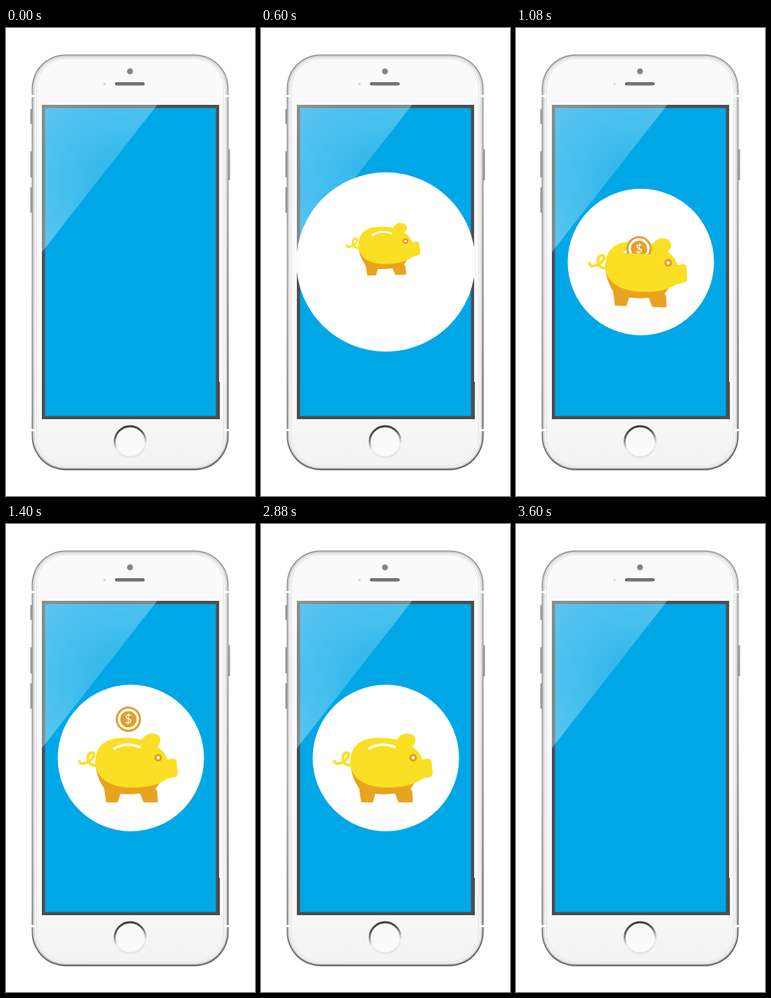
An HTML page that plays this animation: 354 px wide and 664 px high, repeating every 4.8 s.

```html
<!DOCTYPE html>
<html lang="en">
<head>
<meta charset="utf-8">
<title>Savings app</title>
<style>
html, body { margin: 0; width: 100%; height: 100%; overflow: hidden; background: #fff; }
svg { display: block; width: 100vw; height: 100vh; }
</style>
</head>
<body>
<svg viewBox="0 0 354 664">
  <defs>
    <linearGradient id="face" x2="0" y2="1">
      <stop offset="0" stop-color="#fafafa"/>
      <stop offset=".8" stop-color="#fafafa"/>
      <stop offset="1" stop-color="#f3f3f3"/>
    </linearGradient>
    <linearGradient id="rim" x2=".3" y2="1">
      <stop offset="0" stop-color="#999"/>
      <stop offset=".5" stop-color="#a4a4a4"/>
      <stop offset="1" stop-color="#6c6c6c"/>
    </linearGradient>
    <radialGradient id="gloss" gradientUnits="userSpaceOnUse" cx="162" cy="217" r="155">
      <stop offset="0" stop-color="#fff" stop-opacity=".17"/>
      <stop offset="1" stop-color="#fff" stop-opacity=".37"/>
    </radialGradient>
    <linearGradient id="ring" x1=".4" x2=".6" y2="1">
      <stop offset="0" stop-color="#3d3d3d"/>
      <stop offset=".25" stop-color="#5a5a5a"/>
      <stop offset=".5" stop-color="#bbb"/>
      <stop offset=".65" stop-color="#eee"/>
      <stop offset="1" stop-color="#e4e4e4"/>
    </linearGradient>
    <clipPath id="screen"><rect x="51" y="109" width="252" height="445"/></clipPath>
    <clipPath id="slot"><path d="M150 240H198V321Q174 319 150 321Z"/></clipPath>
  </defs>

  <g id="phone">
    <path d="M36 115V136M36 175V212M36 226V262M317 172V216" stroke="#999" stroke-width="3"/>
    <rect x="36.500" y="37.500" width="280" height="590" rx="48" fill="url(#rim)"/>
    <rect x="38.500" y="39.500" width="276" height="585.500" rx="46" fill="#e6e6e6"/>
    <rect x="40" y="41" width="273" height="583" rx="45" fill="#f4f4f4" stroke="#d0d0d0"/>
    <rect x="43.500" y="43.500" width="266" height="578" rx="42" fill="url(#face)" stroke="#e4e4e4"/>
    <path d="M36 96.500H43M310 96.500H317M36 570.500H43M310 570.500H317" stroke="#fff" stroke-width="3"/>
    <circle cx="176.300" cy="61.500" r="4.200" fill="#858585"/>
    <circle cx="140" cy="79.500" r="2" fill="#dcdcdc"/>
    <rect x="155" y="77" width="42" height="4.500" rx="2.200" fill="#5c5c5c"/>
    <path d="M158 79.500H195" stroke="#aaa" stroke-width="2" stroke-dasharray="1 1"/>
    <circle cx="176.500" cy="587" r="22" fill="#fafafa" stroke="url(#ring)" stroke-width="3"/>
    <path d="M51 109H303V502H304V555H51Z" fill="#4d4d4f"/>
    <rect x="55.500" y="113.500" width="243" height="437" fill="#00a7e7"/>
    <path d="M51 109H215L51 318Z" fill="url(#gloss)"/>
  </g>

  <g clip-path="url(#screen)">
    <circle id="disc" cx="177.500" cy="332" fill="#fff"/>
    <g id="pig">
      <path fill="#e8a41f" d="M127 336C127 352 133 366 139.500 375L142.500 395H159L162.500 383Q177 384 190.500 382.500L195.500 395H216L215 379L212.500 376L218 368L224 350Z"/>
      <path fill="none" stroke="#fadf24" stroke-width="4" stroke-linecap="round" d="M104.500 336.500C105 342 114 340 119 336C126 330.500 127 323.500 121 324.500C114.500 326 115 338 121 341Q125 343 130 342"/>
      <path fill="#fadf24" d="M127 337C127 319 138 304 164 303.500Q182 303 193 306C199 298 204 297 209 297.500C217 298 220 302 219.500 307Q219 312 215 316Q225 322 229.500 334L238 333Q242 333 242.500 337L244 354Q244 358 240 359L229 361.500C219 369 204 374 180 374C151 374 127 363 127 337Z"/>
      <path fill="none" stroke="#fff" stroke-width="3.600" stroke-linecap="round" d="M154 318.500Q171 308.500 190 316.500"/>
      <circle cx="216.300" cy="331.700" r="3.900" fill="#fff" stroke="#e59a24" stroke-width="3"/>
      <g clip-path="url(#slot)">
        <g id="coin">
          <circle r="18" fill="#e59f2a"/>
          <circle r="13.300" fill="#e59f2a" stroke="#fff" stroke-width="3.400"/>
          <text y="6" text-anchor="middle" font-family="Lato, sans-serif" font-size="17" fill="#fff">$</text>
        </g>
      </g>
    </g>
  </g>
</svg>
<script>
const LOOP = 4800;
const [disc, pig, coin] = ['disc', 'pig', 'coin'].map(id => document.getElementById(id));

const ease = x => x < .5 ? 4 * x ** 3 : 1 - 4 * (1 - x) ** 3;

// Eased value at time t along [time, value] keys
function track(t, keys) {
  const i = keys.findIndex(k => k[0] > t);
  if (i < 0) return keys[keys.length - 1][1];
  if (i === 0) return keys[0][1];
  const [t0, a] = keys[i - 1], [t1, b] = keys[i];
  return a + (b - a) * ease((t - t0) / (t1 - t0));
}

const radius = [[0, 0], [540, 129], [780, 101.4], [1000, 104], [2870, 104], [3030, 137], [3600, 0]];
const size = [[420, 0], [720, 1], [2870, 1], [3240, 0]];
const lift = [[720, -30], [770, -30], [980, 0]];
const tilt = [[500, 0], [740, -5], [800, -5], [1060, 2], [1100, 2], [1320, 0]];

function draw(t) {
  disc.setAttribute('r', track(t, radius));
  pig.setAttribute('transform', `translate(173 ${338 + track(t, lift)}) rotate(${track(t, tilt)}) scale(${track(t, size)}) translate(-173 -338)`);
  // The coin hops out of the slot and drops back in
  const hop = Math.min(1, Math.abs(t - 1400) / 400);
  coin.setAttribute('transform', `translate(174 ${277 + 63 * hop ** 2.45})`);
  coin.style.display = hop < 1 ? '' : 'none';
}

function tick() {
  draw(performance.now() % LOOP);
  requestAnimationFrame(tick);
}
tick();
</script>
</body>
</html>
```
